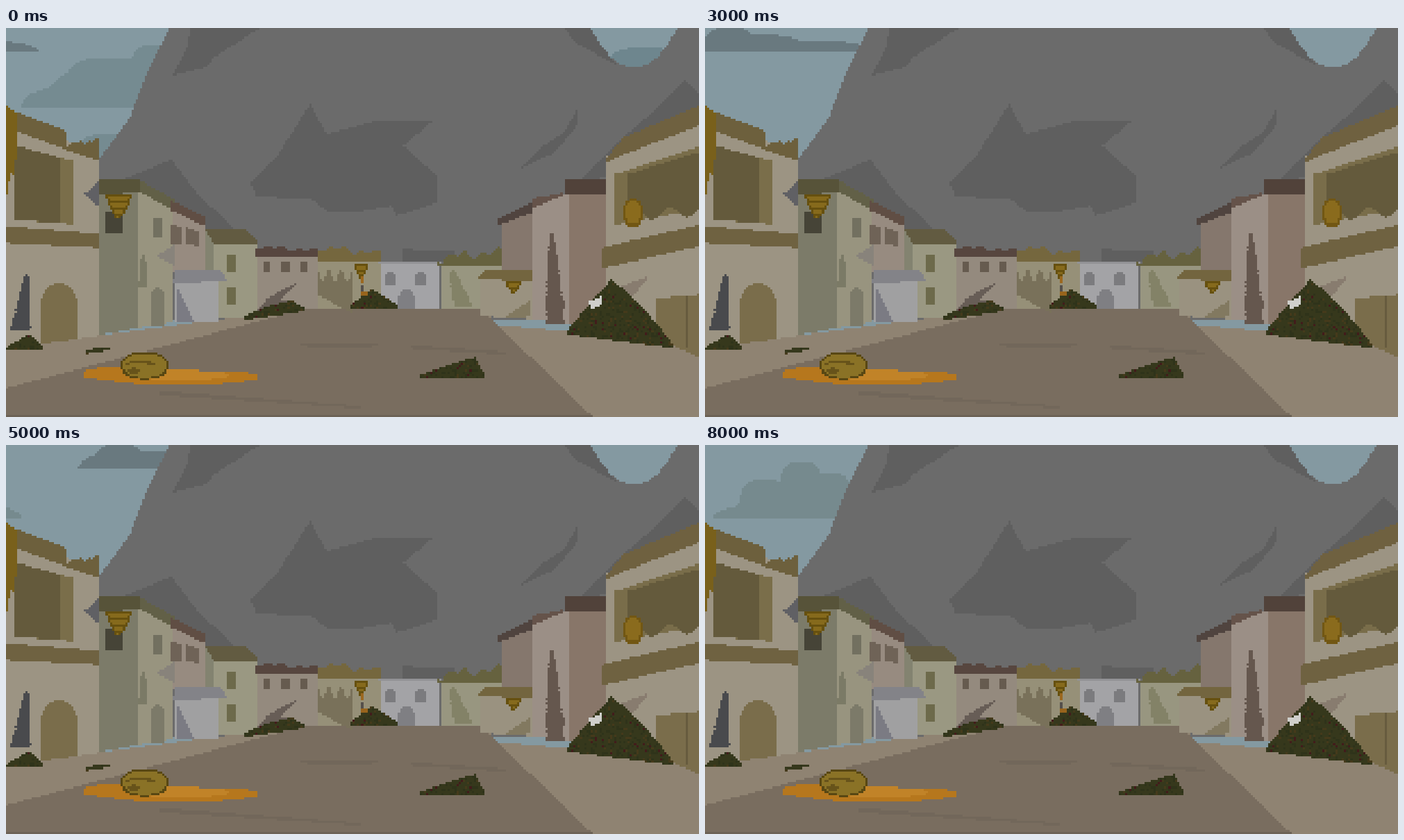
An HTML page with a canvas that plays this animation: 998x561 px, repeating every 10000 ms.

```html
<!DOCTYPE html>
<html lang="en">
<head>
<meta charset="utf-8">
<title>Ruined street</title>
<style>
html, body { margin: 0; width: 100%; height: 100%; overflow: hidden; background: #6b6b6b; }
canvas { display: block; width: 998px; height: 561px; image-rendering: pixelated; }
</style>
</head>
<body>
<canvas id="stage" width="320" height="180"></canvas>
<script>
const W = 320, H = 180, CELL = 998 / W;
const view = document.getElementById('stage').getContext('2d');
const layer = document.createElement('canvas');
layer.width = W;
layer.height = H;
const scene = layer.getContext('2d');
let pen = scene;

let seed = 7;
const rand = () => (seed = seed * 16807 % 2147483647) / 2147483647;
const cell = v => Math.round(v / CELL);
const line = (a, b) => u => a + (b - a) * u;

// All coordinates are stage pixels, snapped to the coarse grid.
function box(color, x1, y1, x2, y2) {
  pen.fillStyle = color;
  pen.fillRect(cell(x1), cell(y1), cell(x2) - cell(x1), cell(y2) - cell(y1));
}

// Fills columns between two edges given as functions of u = 0..1.
function span(color, x1, x2, top, bottom) {
  const a = cell(x1), b = cell(x2);
  for (let x = Math.max(a, 0); x < Math.min(b, W); x++) {
    const u = (x + 0.5 - a) / (b - a);
    const to = cell(bottom(u));
    if (typeof color === 'string') {
      pen.fillStyle = color;
      const from = cell(top(u));
      if (to > from) pen.fillRect(x, from, 1, to - from);
    } else for (let y = cell(top(u)); y < to; y++) {
      pen.fillStyle = color();
      pen.fillRect(x, y, 1, 1);
    }
  }
}

const wall = (color, x1, x2, t1, t2, b1, b2) =>
  span(color, x1, x2, line(t1, t2), line(b1, b2));

function roof(color, x1, x2, t1, t2, b1, b2, rough = 0) {
  const ridge = line(t1, t2);
  span(color, x1, x2, u => ridge(u) + rough * (Math.sin(11 * u + 1) + Math.sin(25 * u)) / 2, line(b1, b2));
}

const arch = (color, x1, x2, top, b1, b2 = b1) =>
  span(color, x1, x2, u => top + (x2 - x1) / 2 * Math.abs(2 * u - 1) ** 2.5, line(b1, b2));

function oval(color, x1, x2, y1, y2) {
  const mid = (y1 + y2) / 2, r = (y2 - y1) / 2;
  const half = u => r * (1 - Math.abs(2 * u - 1) ** 2.5) ** 0.5;
  span(color, x1, x2, u => mid - half(u), u => mid + half(u));
}

function poly(color, points) {
  const p = points.split(' ').map(s => s.split(',').map(v => v / CELL));
  pen.fillStyle = color;
  for (let row = 0; row < H; row++) {
    const y = row + 0.5, hits = [];
    p.forEach(([x1, y1], i) => {
      const [x2, y2] = p[(i + 1) % p.length];
      if ((y1 <= y) !== (y2 <= y)) hits.push(Math.round(x1 + (y - y1) * (x2 - x1) / (y2 - y1)));
    });
    hits.sort((a, b) => a - b);
    for (let i = 0; i + 1 < hits.length; i += 2) pen.fillRect(hits[i], row, hits[i + 1] - hits[i], 1);
  }
}

// A ragged spike that widens downwards.
function crack(color, x1, x2, y1, y2, width) {
  for (let y = y1; y < y2; y += CELL) {
    const v = (y - y1) / (y2 - y1), x = x1 + (x2 - x1) * v;
    const half = 2 + width / 2 * v ** 0.7 * (0.8 + 0.3 * rand());
    box(color, x - half, y, x + half, y + CELL);
  }
}

function hive(x, y, w, h) {
  for (let i = 0; i * CELL < h; i++) {
    const top = y + i * CELL, inset = w * 0.42 * (i * CELL / h) ** 1.4;
    box('#66500f', x + inset, top, x + w - inset, top + CELL);
    if (i % 3) box('#866a1c', x + inset + 3, top, x + w - inset - 3, top + CELL);
  }
}

const waste = () => {
  const r = rand();
  return r < 0.025 ? '#421c1b' : r < 0.09 ? '#453a1b' : r < 0.3 ? '#2f331a' : '#36381c';
};

// A heap with its peak at a share of its width.
function heap(x1, x2, peak, top, b1, b2 = b1) {
  const base = line(b1, b2);
  span(waste, x1, x2, u => {
    const rise = u < peak ? u / peak : (1 - u) / (1 - peak);
    return base(u) + (top - base(u)) * rise ** 0.9;
  }, u => base(u) + 4);
}

function drawMountain() {
  poly('#6b6b6b', '236,0 205,60 178,130 134,190 134,420 998,420 998,0');
  const dark = '#5f5f5f';
  poly(dark, '265,0 366,0 300,42 290,56 240,69 262,24');
  poly(dark, '438,110 462,153 530,135 614,135 572,170 622,215 622,252 562,271 555,257 505,265 465,265 440,248 360,243 352,222 387,190');
  poly(dark, '803,0 842,0 880,54 822,22');
  poly(dark, '823,115 823,140 790,180 742,202 770,172 805,150');
  poly(dark, '978,75 998,95 998,200 825,220 890,157 937,116');
  poly(dark, '160,222 238,190 275,238 328,290 160,300');
  wall(dark, 570, 645, 319, 322, 336, 336);

  // Gap of open sky
  scene.globalCompositeOperation = 'destination-out';
  span('#000', 842, 967, () => 0, u => 57 * (1 - Math.abs(2 * u - 1) ** 2.1));
  scene.globalCompositeOperation = 'source-over';
}

function drawGround() {
  wall('#8f8372', 0, 430, 462, 404, 561, 561);
  wall('#8f8372', 430, 998, 404, 455, 561, 561);
  box('#8f8372', 430, 404, 700, 450);
  poly('#796d5f', '0,520 375,420 430,405 683,405 845,561 0,561');
  oval('#72675a', 420, 540, 455, 461);
  wall('#72675a', 582, 720, 458, 467, 463, 471);
  wall('#72675a', 222, 512, 523, 546, 530, 549);
  box('#6c6256', 0, 558, 845, 561);
}

function drawNearLeft() {
  wall('#9c9483', 0, 134, 130, 180, 463, 444);
  roof('#6d603d', 0, 88, 115, 149, 143, 176);
  roof('#6d603d', 88, 134, 167, 162, 176, 192, 4);
  wall('#7a6e4a', 12, 97, 169, 192, 277, 283);
  wall('#645a3c', 12, 78, 169, 187, 277, 281);
  wall('#6f6241', 0, 134, 286, 297, 310, 317);
  arch('#7a6d4b', 50, 102, 368, 456, 449);
  crack('#494a4d', 30, 21, 355, 433, 24);
  span('#79601b', 0, 17, line(113, 121), u => 236 - 45 * u + 9 * Math.sin(20 * u));
  poly('#606064', '112,240 134,221 134,258');
}

function drawLeftRow() {
  wall('#7c7b69', 134, 190, 228, 232, 443, 433);
  wall('#98947f', 190, 241, 232, 255, 433, 424);
  wall('#575339', 134, 194, 219, 219, 241, 237);
  wall('#626047', 192, 242, 220, 248, 237, 264);
  box('#464437', 144, 265, 168, 296);
  hive(144, 240, 36, 34);
  box('#727060', 211, 274, 224, 302);
  crack('#7b7a66', 198, 197, 328, 372, 9);
  arch('#7c7a69', 208, 229, 374, 430);

  box('#838370', 286, 290, 301, 350);
  wall('#978b80', 239, 287, 260, 283, 352, 352);
  wall('#604e44', 238, 287, 249, 272, 263, 286);
  wall('#6f6357', 238, 252, 283, 287, 311, 311);
  wall('#6f6357', 259, 277, 288, 293, 311, 315);
  poly('#88837b', '217,329 242,313 242,343');

  box('#9a9882', 300, 309, 362, 419);
  poly('#625b41', '286,290 344,290 362,307 362,312 300,312');
  for (const y of [327, 373]) box('#6d6a4b', 318, y, 330, y + 25);

  box('#a0a0a1', 243, 362, 307, 423);
  poly('#838388', '245,349 307,349 320,365 240,368');
  poly('#7b7b83', '245,372 270,423 245,423');
}

function drawFarRow() {
  box('#948a7e', 362, 327, 448, 405);
  roof('#57463f', 359, 448, 315, 321, 329, 331, 4);
  for (const x of [371, 396, 424]) box('#665b4f', x, 337, x + 11, 352);
  poly('#675d56', '418,368 395,394 415,394 360,408 378,389');

  box('#969078', 450, 337, 539, 405);
  roof('#75673e', 449, 541, 316, 326, 338, 338, 6);
  span('#79715a', 450, 498, u => 357 + 9 * Math.sin(18 * u - 1), line(385, 412));
  hive(501, 339, 20, 20);
  box('#9c681f', 512, 360, 515, 367);
  box('#55504b', 512, 370, 515, 379);

  box('#a3a3a6', 540, 337, 625, 405);
  box('#929295', 535, 336, 626, 340);
  for (const x of [546, 590]) arch('#7b7b7e', x, x + 14, 352, 370);
  arch('#7f7f83', 565, 589, 377, 405);

  box('#989680', 627, 340, 715, 405);
  roof('#66623f', 622, 715, 332, 323, 344, 343, 8);
  crack('#838267', 643, 660, 350, 403, 26);
  crack('#838267', 690, 692, 374, 398, 14);
}

function drawRightRow() {
  wall('#85776d', 715, 758, 280, 263, 354, 354);
  wall('#50443f', 709, 760, 276, 249, 284, 266);
  wall('#9a9280', 683, 757, 361, 361, 415, 420);
  poly('#73653f', '690,349 757,349 757,365 678,362');
  poly('#827960', '754,393 754,416 715,419');
  hive(719, 365, 23, 17);

  wall('#9b8f86', 757, 810, 258, 237, 420, 427);
  wall('#887669', 810, 864, 237, 237, 429, 414);
  wall('#65534a', 757, 802, 246, 238, 260, 242);
  box('#51423a', 804, 219, 863, 241);
  crack('#65574e', 786, 791, 297, 426, 26);
}

function drawNearRight() {
  wall('#9c9483', 864, 998, 186, 130, 430, 463);
  wall('#6f6140', 863, 890, 190, 158, 194, 183);
  wall('#6f6140', 890, 998, 158, 112, 183, 141);
  wall('#796d4a', 877, 998, 211, 171, 284, 262);
  span('#645a3c', 895, 998, line(211, 179), u => 271 - 7 * u + 8 * Math.sin(13 * u - 3));
  wall('#6f6241', 858, 998, 317, 284, 347, 315);
  oval('#725713', 888, 918, 247, 287);
  oval('#8a6b1d', 892, 915, 250, 282);
  poly('#887c6f', '878,376 927,357 902,388');
  wall('#7a6d4b', 935, 998, 390, 385, 446, 476);
  box('#675b3e', 980, 386, 983, 461);
}

function drawDebris() {
  heap(808, 962, 0.42, 362, 438, 458);
  poly('#cfcfcb', '839,395 857,387 856,400 843,407');
  heap(497, 563, 0.45, 377, 401);
  box('#98641c', 512, 380, 522, 387);
  heap(344, 431, 0.8, 393, 417, 405);
  heap(0, 53, 0.65, 441, 462);
  heap(115, 150, 0.8, 460, 466, 461);
  heap(597, 689, 0.85, 475, 501);

  span('#b6771d', 112, 362, u => 488 + 10 * u + 8 * (1 - u) ** 16, u => 504 + 4 * u + 10 * Math.sin(Math.PI * u));
  oval('#c18328', 185, 322, 494, 508);
  oval('#584713', 165, 235, 467, 507);
  oval('#8a7226', 168, 232, 470, 504);
  oval('#67531a', 172, 215, 481, 488);
  oval('#8a7226', 172, 209, 484, 491);
  oval('#67531a', 174, 194, 491, 499);
}

// Bumps are [centre, half width, height] above a flat base.
function cloud(color, x, base, bumps) {
  for (const [dx, r, h] of bumps) {
    span(color, x + dx - r, x + dx + r, u => base - h * (1 - (2 * u - 1) ** 4) ** 0.5, () => base);
  }
}

function drawSky(t) {
  pen = view;
  box('#8499a1', 0, 0, 998, 561);
  const drift = 64 * t;
  cloud('#758b91', 148 + drift, 115, [[-23, 103, 30], [0, 92, 55], [2, 72, 72], [67, 45, 90]]);
  cloud('#758b91', 170 + drift, 195, [[0, 75, 43]]);
  if (t < 2) cloud('#6e868e', 920 + drift / 2, 60, [[0, 55, 31]]);
  cloud('#69797f', drift - 156, 34, [[0, 40, 34], [26, 85, 24], [72, 132, 16]]);
  const left = 8 - t;
  if (left < 4) cloud('#768a8e', 139 - 25 * left * left, 105, [[-8, 117, 19], [-53, 39, 55], [0, 36, 80], [37, 38, 66]]);
}

drawMountain();
drawGround();
drawNearLeft();
drawLeftRow();
drawFarRow();
drawRightRow();
drawNearRight();
drawDebris();

let shown = -1;
function frame() {
  const step = Math.min(Math.floor(performance.now() / 1000) % 10, 8);
  if (step !== shown) {
    shown = step;
    drawSky(step);
    view.drawImage(layer, 0, 0);
  }
  requestAnimationFrame(frame);
}
frame();
</script>
</body>
</html>
```
